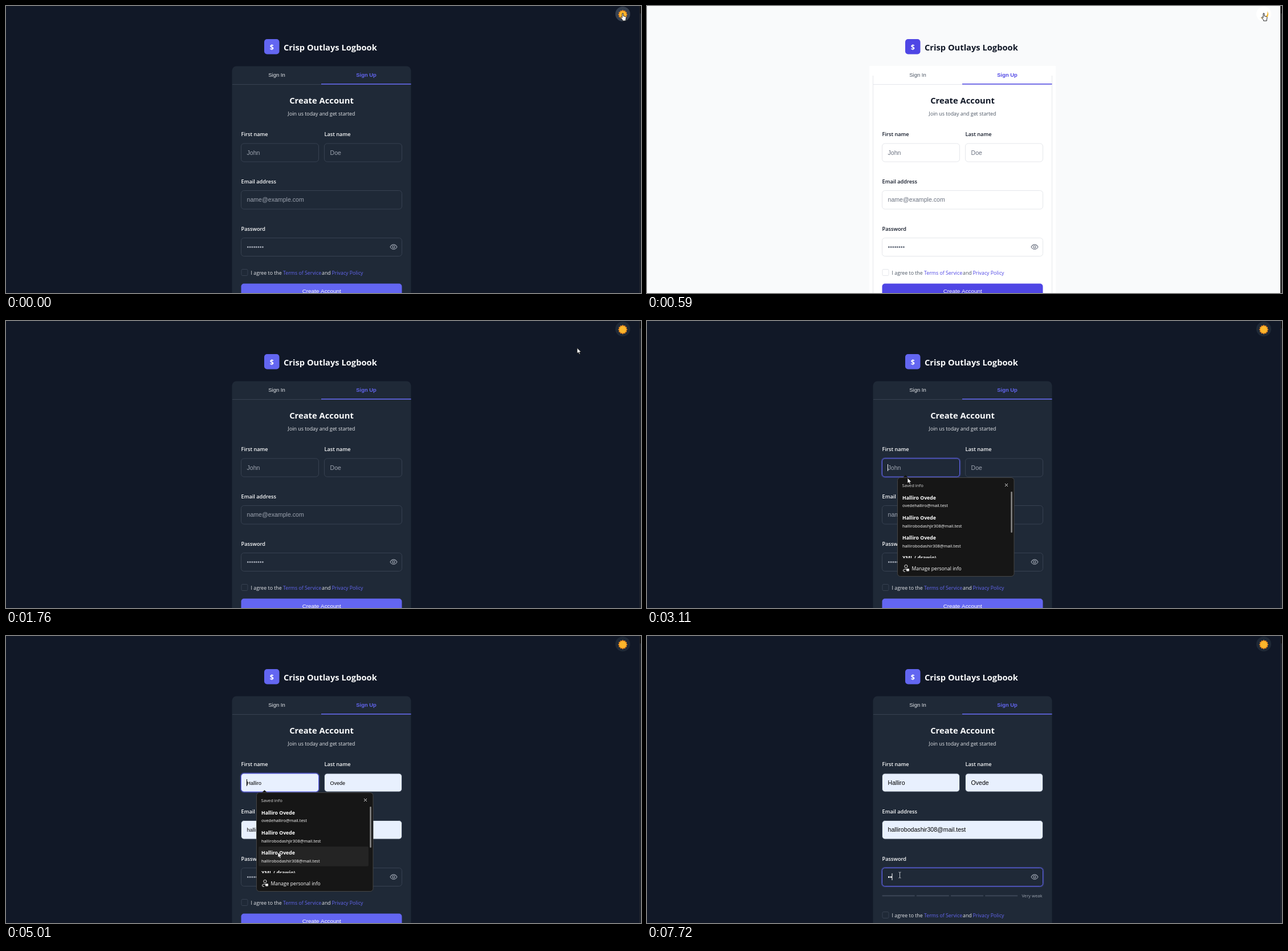
Animation, 1114 px wide and 503 px high, one loop 8000 ms. Source, as an HTML page with a canvas:

```html
<!DOCTYPE html>
<html lang="en">
<head>
<meta charset="utf-8">
<title>Sign up form</title>
<style>
  html, body { margin: 0; width: 100%; height: 100%; overflow: hidden; background: #111827; }
  canvas { display: block; }
</style>
</head>
<body>
<canvas id="stage" width="1114" height="503"></canvas>
<script>
const g = document.getElementById('stage').getContext('2d');
const LOOP = 8000;
const SANS = '"Open Sans", "Noto Sans", sans-serif';
const ARIAL = '"Liberation Sans", Arial, sans-serif';
const FIRST = 'Halliro', LAST = 'Ovede';
const MAILS = ['ovedehalliro@mail.test', 'hallirobodashjir308@mail.test', 'hallirobodashir308@mail.test'];

// Key moments in ms
const TO_LIGHT = 290, TO_DARK = 1350, OPEN = 2710, PICK = 5100, PASS = 6160, KEY1 = 7410, KEY2 = 7720;

// Screen refreshes: [start, end, count]
const RUNS = [[0, 0, 1], [290, 590, 3], [1350, 2290, 8], [2440, 2440, 1], [2710, 2710, 1], [3110, 4070, 8],
  [4190, 4730, 5], [5010, 5860, 7], [6160, 6160, 1], [6460, 6580, 2], [7140, 7140, 1], [7410, 7410, 1], [7720, 7720, 1]];
const TICKS = RUNS.flatMap(([a, b, n]) => Array.from({ length: n }, (_, i) => n > 1 ? a + (b - a) * i / (n - 1) : a));

// Pointer path: [time, x, y]
const PATH = [[0, 1083, 19], [1600, 1083, 19], [2290, 437, 245], [2440, 436, 254], [2710, 436, 254], [3110, 457, 275],
  [3520, 480, 308], [4070, 500, 326], [4400, 505, 350], [4730, 477, 379], [5150, 477, 379], [5860, 443, 419], [8000, 443, 419]];

const FIELDS = {
  first: [412.5, 241, 136, 32],
  last: [558.5, 241, 136, 32],
  email: [412.5, 323.5, 282, 32.5],
  pass: [412.5, 406.5, 282, 32]
};

const clamp = u => Math.max(0, Math.min(1, u));
const ease = u => 1 - Math.pow(1 - clamp(u), 2.3);
const smooth = u => u * u * (3 - 2 * u);
const snap = t => TICKS.reduce((last, s) => s <= t + 0.5 ? s : last, 0);
const inside = ([x, y, w, h], p) => p.x > x && p.x < x + w && p.y > y && p.y < y + h;

function mix(a, b, k) {
  const part = (c, i) => parseInt(c.slice(i, i + 2), 16);
  return `rgb(${[1, 3, 5].map(i => Math.round(part(a, i) + (part(b, i) - part(a, i)) * k))})`;
}

function pointerAt(t) {
  const i = Math.max(1, PATH.findIndex(p => p[0] > t));
  const [a, b] = [PATH[i - 1], PATH[i]];
  const u = smooth((t - a[0]) / (b[0] - a[0]));
  return { x: a[1] + (b[1] - a[1]) * u, y: a[2] + (b[2] - a[2]) * u };
}

function text(s, x, y, size, color, { weight = 400, font = SANS, align = 'left' } = {}) {
  g.font = `${weight} ${size}px ${font}`;
  g.textAlign = align;
  g.fillStyle = color;
  g.fillText(s, x, y);
}

function box(x, y, w, h, r, fill, stroke, line = 1) {
  g.beginPath();
  g.roundRect(x, y, w, h, r);
  if (fill) { g.fillStyle = fill; g.fill(); }
  if (stroke) { g.strokeStyle = stroke; g.lineWidth = line; g.stroke(); }
}

function rect(x, y, w, h, color) {
  g.fillStyle = color;
  g.fillRect(x, y, w, h);
}

function disc(x, y, r, fill) {
  g.beginPath();
  g.arc(x, y, r, 0, 7);
  g.fillStyle = fill;
  g.fill();
}

function shape(d, x, y, fill, stroke, line = 1) {
  const p = new Path2D(d);
  g.save();
  g.translate(x, y);
  if (fill) { g.fillStyle = fill; g.fill(p); }
  if (stroke) { g.strokeStyle = stroke; g.lineWidth = line; g.stroke(p); }
  g.restore();
}

function sun(x, y) {
  g.beginPath();
  for (let i = 0; i < 24; i++) {
    const a = i * Math.PI / 12, r = i % 2 ? 6.6 : 8.4;
    g.lineTo(x + r * Math.cos(a), y + r * Math.sin(a));
  }
  g.fillStyle = '#f08c1e';
  g.fill();
  disc(x, y, 6, '#fbb62c');
}

function themeToggle(s) {
  const hover = s.mouse.x > 1068 && s.mouse.y < 28;
  disc(1082, 14, 13, s.soft(hover ? '#374151' : '#1f2937', '#ffffff'));
  if (s.light) shape('M6 -5 A8 8 0 1 1 -6 6 A9 9 0 0 0 6 -5Z', 1082, 14, '#f5b82e');
  else sun(1082, 15);
}

function eye(x, y, color) {
  shape('M-6 0 Q-3.5 -4.2 0 -4.2 Q3.5 -4.2 6 0 Q3.5 4.2 0 4.2 Q-3.5 4.2 -6 0Z M2 0 A2 2 0 1 1 -2 0 A2 2 0 1 1 2 0', x, y, null, color, 1.1);
}

function field(s, name, hint, value, preview) {
  const [x, y, w, h] = FIELDS[name];
  const focused = s.focus === name;
  if (focused) box(x - 1, y - 1, w + 2, h + 2, 6, null, 'rgba(99,102,241,.28)', 2);
  const fill = value ? '#e8f0fe' : s.hard('#1f2937', '#ffffff');
  box(x, y, w, h, 5, fill, focused ? '#6366f1' : s.soft('#374151', '#e5e7eb'));
  text(value || hint, x + 10, y + 19.6, value && preview ? 9 : 10.6,
    value ? '#000000' : s.hard('#9ca3af', '#6b7280'), { font: ARIAL });
}

function caret(x, y, color) {
  rect(x, y, 1, 12, color);
}

function header(s) {
  box(453, 58, 26.5, 26.5, 5, s.hard('#6366f1', '#4f46e5'));
  text('$', 466.3, 76.6, 12.5, '#ffffff', { weight: 700, align: 'center' });
  text('Crisp Outlays Logbook', 487, 77.5, 14.7, s.hard('#f9fafb', '#111827'), { weight: 700 });
}

function tabs(s) {
  const accent = s.soft('#6366f1', '#4f46e5');
  text('Sign In', 475, 124.3, 9.5, s.soft('#e5e7eb', '#4b5563'), { font: ARIAL, align: 'center' });
  text('Sign Up', 632, 124.3, 9.4, accent, { font: ARIAL, weight: 700, align: 'center' });
  rect(397, 137, 313.5, 1, s.soft('#374151', '#e5e7eb'));
  rect(553, 136, 157.5, 1.5, accent);
}

function strength() {
  for (let i = 0; i < 4; i++) box(412.5 + i * 60.2, 454, 57.3, 2.6, 1.3, '#374151');
  text('Very weak', 657.5, 458.3, 7.6, '#9ca3af');
}

function agreement(s, dy) {
  const link = s.soft('#6366f1', '#4f46e5'), plain = s.hard('#e5e7eb', '#4b5563');
  box(413, 461.5 + dy, 11, 11, 2, s.soft('#1f2937', '#ffffff'), s.soft('#374151', '#e5e7eb'));
  [['I agree to the', 429.5, plain], ['Terms of Service', 486, link], ['and', 554, plain], ['Privacy Policy', 571.5, link]]
    .forEach(([str, x, color]) => text(str, x, 470.6 + dy, 8.8, color));
  box(412.5, 486.5 + dy, 282, 28, 5, link);
  text('Create Account', 553.7, 502.7 + dy, 9.9, '#ffffff', { font: ARIAL, align: 'center' });
}

function card(s) {
  if (s.light && s.k === 1) {
    rect(390, 105, 327, 398, '#ffffff');
    rect(396, 122, 1, 381, '#e5e7eb');
    rect(710, 122, 1, 381, '#e5e7eb');
  } else {
    box(396.5, 105.5, 314, 420, 8, s.soft('#1f2937', '#ffffff'));
  }
  tabs(s);
  text('Create Account', 553.5, 170.6, 14.75, s.hard('#f9fafb', '#111827'), { weight: 700, align: 'center' });
  text('Join us today and get started', 553.5, 192.4, 8.85, s.hard('#e5e7eb', '#4b5563'), { align: 'center' });

  const label = s.soft('#f9fafb', '#111827');
  [['First name', 412.5, 228], ['Last name', 558.5, 228], ['Email address', 412.5, 310.5], ['Password', 412.5, 393.5]]
    .forEach(([str, x, y]) => text(str, x, y, 9.2, label, { weight: 600 }));

  const chosen = s.picked ? 2 : s.row;
  const filled = chosen >= 0, preview = !s.picked;
  field(s, 'first', 'John', filled && FIRST, preview);
  field(s, 'last', 'Doe', filled && LAST, preview);
  field(s, 'email', 'name@example.com', filled && MAILS[chosen], preview);
  field(s, 'pass', s.keys ? '' : '•'.repeat(8));
  if (s.keys) text('•'.repeat(s.keys), 422.5, 426.1, 10.6, '#ffffff', { font: ARIAL });
  eye(680, 422.3, s.soft('#9ca3af', '#6b7280'));

  if (s.focus === 'first' && s.blink) caret(422, 251, filled ? '#000000' : '#ffffff');
  if (s.focus === 'pass' && s.blink) caret(422 + s.keys * 3.75, 416, '#ffffff');
  if (s.keys) strength();
  agreement(s, s.keys ? 22 : 0);
}

function dropdown(s) {
  shape('M-5 5 L0 0 L5 5Z', 453.5, 270, '#161616');
  box(439.5, 274.5, 204.5, 173, 5, '#161616', '#454545');
  text('Saved info', 447.5, 291, 7.7, '#dddddd');
  shape('M-2.5 -2.5 L2.5 2.5 M2.5 -2.5 L-2.5 2.5', 630.5, 287.5, null, '#e5e5e5');

  g.save();
  g.beginPath();
  g.rect(440, 298, 200, 117.5);
  g.clip();
  MAILS.forEach((mail, i) => {
    const y = 298.5 + i * 35.2;
    if (s.row === i) box(443, y, 193, 34.5, 2, '#242424');
    text(`${FIRST} ${LAST}`, 448, y + 14, 8.7, '#ffffff', { weight: 700 });
    text(mail, 448, y + 27.8, 7.5, '#ffffff');
  });
  text('XML (.drawio)', 448, 418.2, 8.7, '#ffffff', { weight: 700 });
  g.restore();

  box(638.3, 299, 2.6, 72, 1.3, '#858585');
  shape('M3 0 A2.6 2.6 0 1 1 -2.2 0 A2.6 2.6 0 1 1 3 0 M-1 9 H-3 Q-4.5 9 -4.5 7 Q-4.5 5 -2 5 H1', 454, 430, null, '#e5e5e5');
  box(455, 434, 5, 4.5, 1, '#e5e5e5');
  text('Manage personal info', 464.5, 436.5, 8.6, '#ffffff');
}

function pointer(s) {
  const { x, y } = s.mouse;
  if (x > 1068 && y < 28) {
    shape('M-2 -5 Q-2 -6.5 -1 -6.5 Q0 -6.5 0 -5 V-1.5 L3.5 -.5 Q5 0 5 1.5 L4.2 5 V7 H-1.5 V5.5 L-4.5 1.5 Q-4.5 0 -3.5 .3 L-2 1.5Z',
      x, y, '#ffffff', '#111111', 0.9);
  } else if (Object.values(FIELDS).some(f => inside(f, s.mouse)) && !(s.open && y > 270)) {
    shape('M-2 -5 H-.5 L0 -4.5 L.5 -5 H2 M0 -4.5 V4.5 M-2 5 H-.5 L0 4.5 L.5 5 H2', x + 0.5, y, null, '#d1d5db', 0.9);
  } else {
    shape('M0 0 V9.5 L2.2 7.5 L3.8 11 L5.4 10.3 L3.9 7 H7Z', x, y, '#ffffff', '#111111', 0.8);
  }
}

function scrollbar(s) {
  rect(1111, 0, 3, 503, s.hard('#1d222c', '#2c2c2c'));
  rect(1112, 0, 2, 13, '#101010');
}

function stateAt(time) {
  const t = snap(time);
  const light = t >= TO_LIGHT && t < TO_DARK;
  const k = t < TO_LIGHT ? 0 : light ? ease((t - TO_LIGHT) / 300) : 1 - ease((t - TO_DARK) / 300);
  const mouse = pointerAt(t);
  const open = t >= OPEN && t < PICK;
  const since = t - (t >= KEY2 ? KEY2 : t >= KEY1 ? KEY1 : t >= PASS ? PASS : OPEN);
  return {
    light, k, mouse, open,
    hard: (dark, pale) => light ? pale : dark,
    soft: (dark, pale) => mix(dark, pale, k),
    picked: t >= PICK,
    row: open && mouse.y > 298 ? Math.min(2, Math.floor((mouse.y - 298) / 35.3)) : -1,
    focus: t >= PASS ? 'pass' : t >= OPEN ? 'first' : '',
    keys: (t >= KEY1) + (t >= KEY2),
    blink: Math.floor((since + 90) / 510) % 2 === 0
  };
}

function draw(time) {
  const s = stateAt(time);
  rect(0, 0, 1114, 503, s.hard('#111827', '#f9fafb'));
  header(s);
  card(s);
  themeToggle(s);
  scrollbar(s);
  if (s.open) dropdown(s);
  pointer(s);
}

const start = performance.now();
function frame() {
  draw((performance.now() - start) % LOOP);
  requestAnimationFrame(frame);
}
frame();
</script>
</body>
</html>
```
